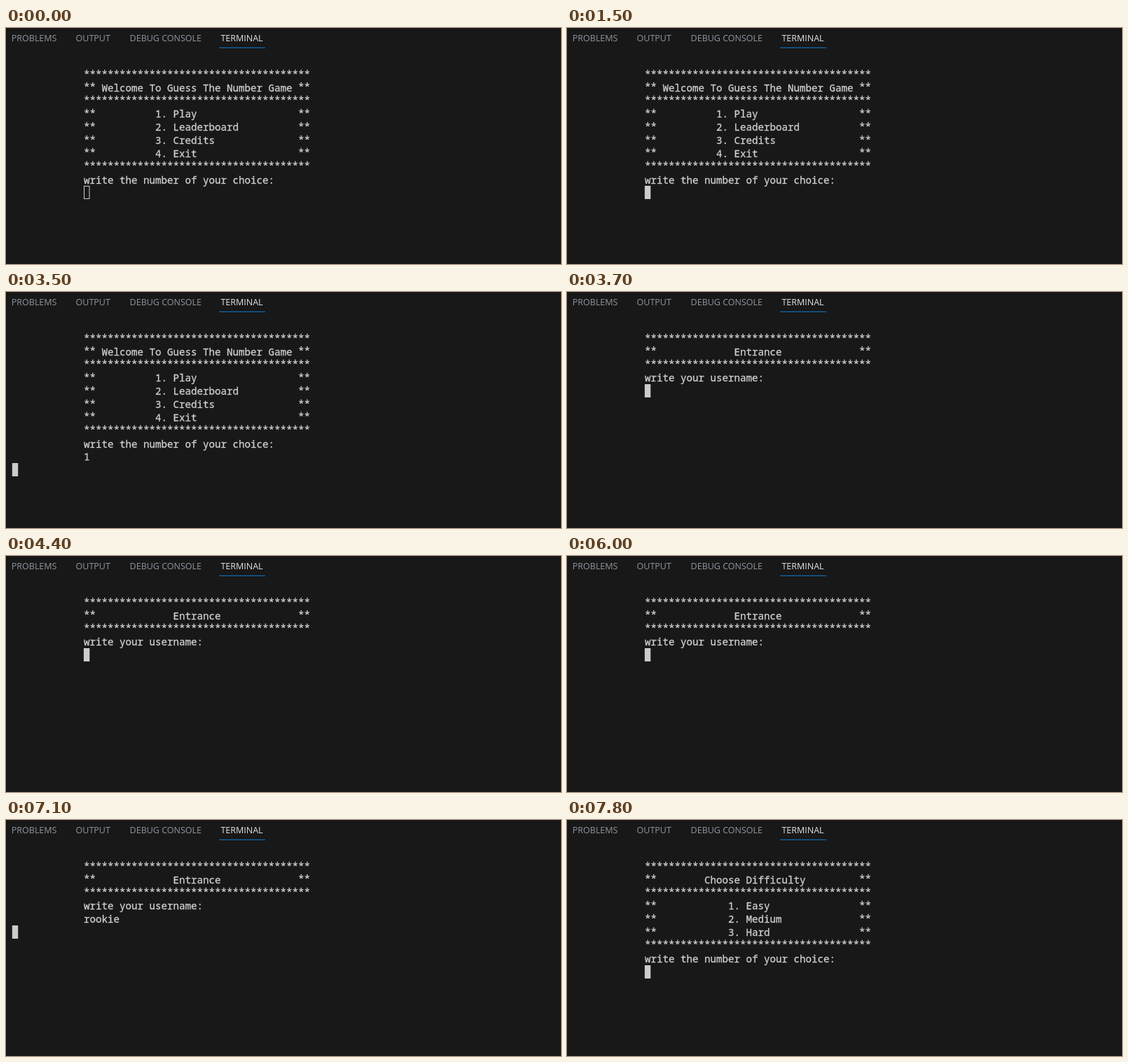
Write an HTML page that moves like this. It is 792 by 338 pixels and loops after 8000 ms.

```html
<!DOCTYPE html>
<html lang="en">
<head>
<meta charset="utf-8">
<title>Number game terminal</title>
<style>
  html, body { margin: 0; width: 100%; height: 100%; overflow: hidden; background: #181818; }
  svg { display: block; width: 792px; height: 338px; }
  .tabs { font: 12.5px "Open Sans", "Noto Sans", sans-serif; fill: #8e96a1; }
  .tabs .active { fill: #e4e4e4; }
  .screen { font: 14.18px "Noto Sans Mono", "DejaVu Sans Mono", monospace; fill: #d0d0d0; stroke: #d0d0d0; stroke-width: 0.3; }
  .screen text { white-space: pre; }
</style>
</head>
<body>
<svg viewBox="0 0 792 338">
  <rect width="792" height="338" fill="#181818"/>
  <g class="tabs">
    <text x="7.8" y="19">PROBLEMS</text>
    <text x="99.6" y="19">OUTPUT</text>
    <text x="176.6" y="19">DEBUG CONSOLE</text>
    <text x="306.4" y="19" class="active">TERMINAL</text>
  </g>
  <rect x="304.4" y="27.7" width="65.4" height="1.2" fill="#146fb5"/>
  <g class="screen" id="screen"></g>
  <rect id="cursor" stroke="#ccc"/>
</svg>
<script>
const LOOP = 8000;
const CELL = 8.508, LEFT = 8.8, ROW = 18.83, TOP = 57;
const INDENT = 12, WIDTH = 38, ROWS = 11;
const TEXT_BASE = 14.9, STAR_BASE = 13.5;
const NAME = "rookie";

const stars = "*".repeat(WIDTH);
const boxed = (text, at) => ("**" + " ".repeat(at - 2) + text).padEnd(WIDTH - 2) + "**";
const panel = (title, at, items = [], itemAt = 0) => [
  stars, boxed(title, at), stars,
  ...items.map((item, i) => boxed(`${i + 1}. ${item}`, itemAt)),
  ...(items.length ? [stars] : [])
];

const ask = "write the number of your choice:";
const menu = [...panel("Welcome To Guess The Number Game", 3,
  ["Play", "Leaderboard", "Credits", "Exit"], 12), ask];
const entrance = [...panel("Entrance", 15), "write your username:"];
const difficulty = [...panel("Choose Difficulty", 10, ["Easy", "Medium", "Hard"], 14), ask];

// Each scene: start time, screen, typed answer as [time, length] steps, time of Enter
const scenes = [
  { start: 0, lines: menu, answer: "1", keys: [[3000, 1]], enter: 3500 },
  { start: 3700, lines: entrance, answer: NAME,
    keys: [[6100, 1], [6200, 2], [6500, 4], [6700, 5], [6800, 6]], enter: 7100 },
  { start: 7400, lines: difficulty, answer: "", keys: [], enter: LOOP }
];
const FOCUS = 500;

const screen = document.getElementById("screen");
const cursor = document.getElementById("cursor");

function setAttrs(el, attrs) {
  for (const key in attrs) el.setAttribute(key, attrs[key]);
}

function makeRow(row, base) {
  const el = document.createElementNS("http://www.w3.org/2000/svg", "text");
  setAttrs(el, { x: LEFT + INDENT * CELL, y: Math.round(TOP + row * ROW + base) });
  return screen.appendChild(el);
}

function setText(el, text) {
  if (el.textContent !== text) el.textContent = text;
}

// Asterisks sit higher than the letters, so every row has two layers
const rows = Array.from({ length: ROWS }, (_, r) => ({
  letters: makeRow(r, TEXT_BASE),
  stars: makeRow(r, STAR_BASE)
}));

function placeCursor(col, row, focused) {
  const x = LEFT + col * CELL, y = Math.round(TOP + row * ROW);
  setAttrs(cursor, focused
    ? { x, y, width: 8.4, height: 19, fill: "#ccc", "stroke-width": 0 }
    : { x: Math.round(x) + 0.5, y: y + 0.5, width: 7.5, height: 18, fill: "none", "stroke-width": 1 });
}

function draw(t) {
  const scene = scenes.filter(s => t >= s.start).pop();
  const typed = scene.keys.reduce((n, [at, len]) => t >= at ? len : n, 0);
  const lines = [...scene.lines, scene.answer.slice(0, typed)];
  rows.forEach((row, r) => {
    const text = lines[r] || "";
    setText(row.letters, text.replace(/\*/g, " "));
    setText(row.stars, text.replace(/[^*]/g, " "));
  });
  const entered = t >= scene.enter;
  placeCursor(entered ? 0 : INDENT + typed, lines.length - (entered ? 0 : 1), t >= FOCUS);
}

const begin = performance.now();
function tick() {
  draw((performance.now() - begin) % LOOP);
  requestAnimationFrame(tick);
}
tick();
</script>
</body>
</html>
```
